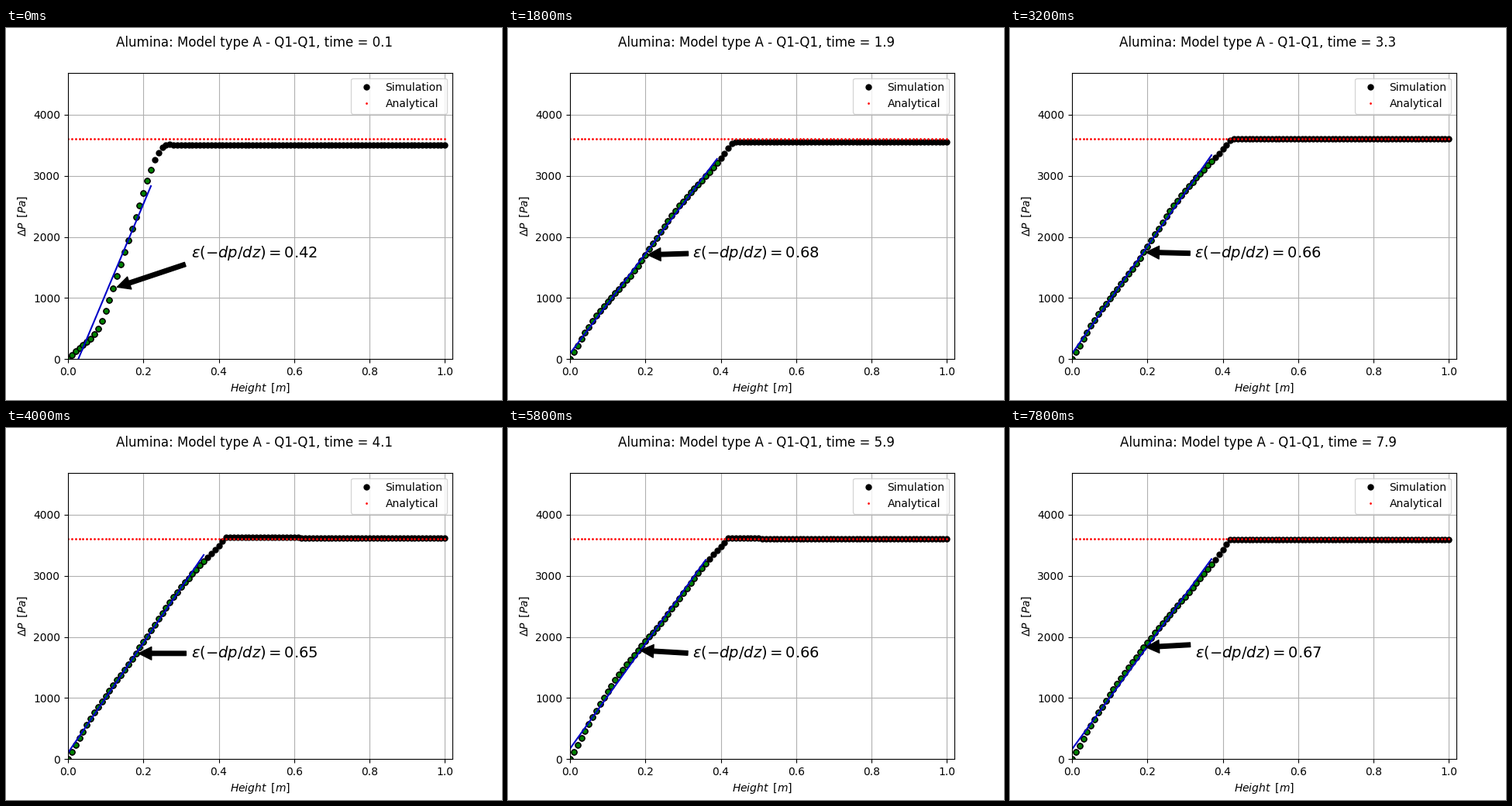
A matplotlib script that plays this animation: 640x480 px, repeating every 8000 ms.

```python
import numpy as np
import matplotlib.pyplot as plt
from matplotlib.animation import FuncAnimation

FRAMES, STEP = 40, 200
ANALYTICAL = 3606
BED_WEIGHT = 2600 * 9.81    # weight of the packed solid per volume
SAG = 12                    # slow pressure drop along the plateau
x = np.arange(101) / 100

# time (ms), bed height, plateau pressure, sine amplitudes of the ramp's bulge
KEYS = np.array([
    (0,    0.279, 3511, -176, -372, 85, -28, 53),
    (1000, 0.44,  3518,   58,   55, 28,  48,  0),
    (2400, 0.428, 3593,  150,  -25, 30,  45,  0),
    (4000, 0.42,  3631,  233,  -18, 34,  21,  0),
    (5000, 0.42,  3603,  195,   11,  4, -10,  0),
    (6600, 0.42,  3631,  266,  106, 68, -20,  0),
    (7800, 0.42,  3600,  191,   64,  1,   8,  0),
])


def pressure(ms):
    bed, top, *waves = (np.interp(ms, KEYS[:, 0], col) for col in KEYS.T[1:])
    s = np.minimum(x / bed, 1)
    bulge = sum(a * np.sin(k * np.pi * s) for k, a in enumerate(waves, 1))
    return (top - SAG * np.maximum(x, bed)) * s + bulge


fig, ax = plt.subplots(figsize=(6.4, 4.8), dpi=100)
title = fig.suptitle("")
ax.set_xlim(0, 1.02)
ax.set_ylim(0, 1.3 * ANALYTICAL)
ax.set_xlabel(r"$Height \enspace [m]$")
ax.set_ylabel(r"$\Delta P \enspace [Pa]$")
ax.grid(True)

simulation, = ax.plot([], [], "ko", ms=5, label="Simulation")
ax.plot(x, np.full_like(x, ANALYTICAL), "r.", ms=2, label="Analytical")
fitted, = ax.plot([], [], "o", color="green", mec="black", ms=5)
line, = ax.plot([], [], color="#0000c8")
ax.legend(loc="upper right")

note = ax.annotate("", xy=(0, 0), xytext=(0.65, 0.4), textcoords="axes fraction",
                   ha="right", va="top", fontsize=14,
                   arrowprops=dict(facecolor="black", shrink=0.05))


def update(i):
    ms = i * STEP
    y = pressure(ms)
    n = np.count_nonzero(y < 0.9 * ANALYTICAL)
    mid = round(n / 2)
    fit = np.polyfit(x[:n], y[:n], 1)
    voidage = round(float(1 - fit[0] / BED_WEIGHT), 2)

    simulation.set_data(x, y)
    fitted.set_data(x[:n], y[:n])
    line.set_data(x[:n], np.polyval(fit, x[:n]))
    note.xy = (x[mid], y[mid])
    note.set_text(rf"$\varepsilon(-dp/dz) = {voidage}$")
    title.set_text(f"Alumina: Model type A - Q1-Q1, time = {0.1 + ms / 1000:.1f}")
    return simulation, fitted, line, note, title


anim = FuncAnimation(fig, update, frames=FRAMES, interval=STEP,
                     repeat=True, repeat_delay=0, blit=False)
plt.show()
```
